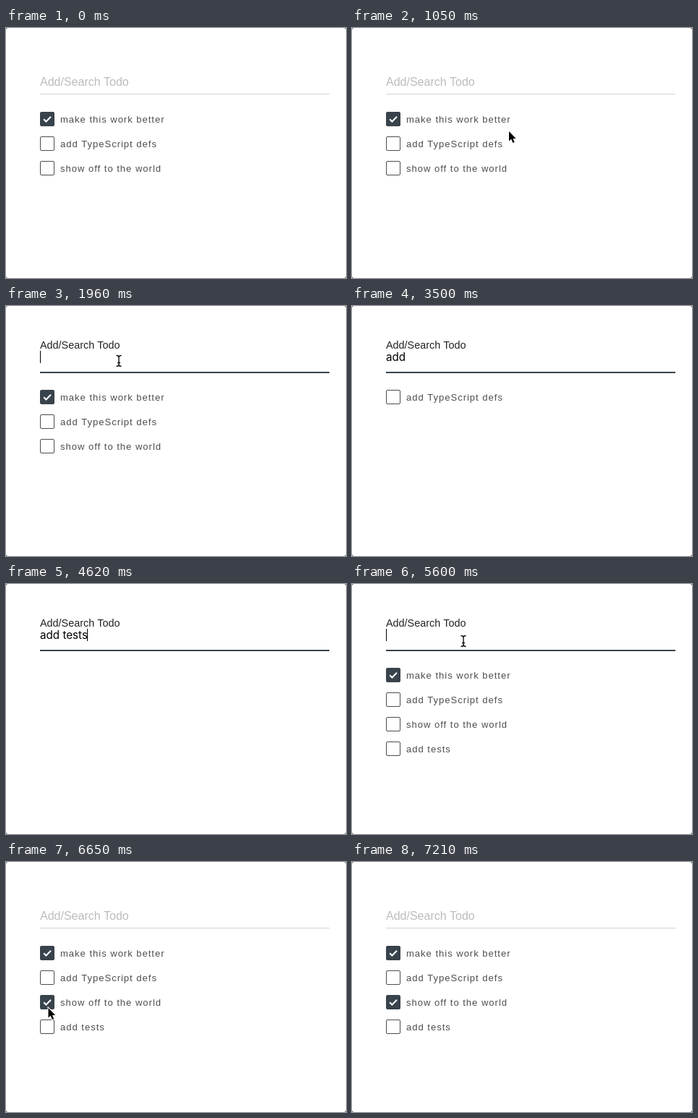
Recreate the animation shown at these times as an HTML page with a canvas. Size 470x346 px, loop 7770 ms.

```html
<!DOCTYPE html>
<html lang="en">
<head>
<meta charset="utf-8">
<title>Todo list</title>
<style>
  html, body { margin: 0; width: 470px; height: 346px; overflow: hidden; background: #fff; }
  canvas { display: block; width: 470px; height: 346px; }
</style>
</head>
<body>
<canvas id="stage"></canvas>
<script>
const W = 470, H = 346, LOOP = 7770, STEP = 70;
const LEFT = 47, RIGHT = 447, DARK = '#39434c';
const LABEL_FONT = '"Liberation Sans", Arial, sans-serif';
const INPUT_FONT = '15.2px Inter, sans-serif';

const canvas = document.getElementById('stage');
const ctx = canvas.getContext('2d');
const dpr = window.devicePixelRatio || 1;
canvas.width = W * dpr;
canvas.height = H * dpr;

// [time, text in the field]
const typing = [
  [0, ''], [2240, 'a'], [2660, 'ad'], [2800, 'add'], [3010, 'add '],
  [4060, 'add t'], [4200, 'add te'], [4340, 'add tes'],
  [4480, 'add test'], [4620, 'add tests'], [5180, '']
];

// [time, x, y] of the pointer tip, one path per visit
const visits = [
  [[980, 281, 204], [1050, 217, 143], [1120, 217, 143], [1190, 208, 135],
   [1330, 179, 105], [1470, 161, 83], [1610, 156, 76], [2170, 156, 76]],
  [[5600, 154, 79], [5740, 137, 104], [5880, 107, 147], [6020, 84, 173],
   [6160, 71, 185], [6370, 61, 191], [6580, 61, 192], [6720, 56, 212],
   [6930, 42, 276], [7140, 28, 338]]
];

const clamp = v => Math.max(0, Math.min(1, v));
const mix = (a, b, p) => a + (b - a) * p;
const ease = p => p * p * (3 - 2 * p);
const gray = v => `rgb(${v},${v},${v})`;

function fieldText(t) {
  return typing.filter(k => k[0] <= t).pop()[1];
}

function pointerAt(t) {
  const path = visits.find(v => t >= v[0][0] && t <= v[v.length - 1][0]);
  if (!path) return null;
  const i = Math.max(1, path.findIndex(k => k[0] >= t));
  const a = path[i - 1], b = path[i];
  const p = (t - a[0]) / (b[0] - a[0]);
  return [mix(a[1], b[1], p), mix(a[2], b[2], p)];
}

function focusAt(t) {
  return ease(t < 5000 ? clamp((t - 1680) / 280) : 1 - clamp((t - 6370) / 280));
}

function caretOn(t) {
  if (t < 1750 || t >= 6440) return false;
  return !(t >= 3500 && t < 4060) && !(t >= 5670 && t < 6160);
}

function itemsAt(t) {
  const list = [
    { text: 'make this work better', done: true },
    { text: 'add TypeScript defs', done: false },
    { text: 'show off to the world', done: t >= 6510 }
  ];
  if (t >= 5180) list.push({ text: 'add tests', done: false });
  const query = fieldText(t).trim();
  return list.filter(item => item.text.includes(query));
}

function text(str, x, y, font, color, spacing = 0) {
  ctx.font = font;
  ctx.letterSpacing = spacing + 'px';
  ctx.fillStyle = color;
  ctx.fillText(str, x, y);
}

function trace(points, close) {
  ctx.beginPath();
  points.forEach(([x, y]) => ctx.lineTo(x, y));
  if (close) ctx.closePath();
}

function drawField(t) {
  const f = focusAt(t);
  const hover = t < 5000 ? clamp((t - 1400) / 210) : 0;
  ctx.fillStyle = gray(Math.round(mix(210, 172, hover)));
  ctx.fillRect(LEFT, 91, RIGHT - LEFT, 1);
  ctx.globalAlpha = f;
  ctx.fillStyle = DARK;
  ctx.fillRect(LEFT, 91, RIGHT - LEFT, 2);
  ctx.globalAlpha = 1;

  text('Add/Search Todo', LEFT, mix(80, 59, f), `${mix(16, 14.4, f)}px ${LABEL_FONT}`,
    gray(Math.round(mix(188, 34, f))));

  const value = fieldText(t);
  text(value, LEFT, 76, INPUT_FONT, '#000');
  if (caretOn(t)) {
    const x = LEFT + Math.floor(ctx.measureText(value).width);
    ctx.fillRect(x, 62, 1, 17);
  }
}

function drawItem(item, row) {
  const y = 116 + row * 34;
  ctx.beginPath();
  ctx.roundRect(LEFT + 0.5, y + 0.5, 19, 19, 1.5);
  ctx.fillStyle = item.done ? DARK : '#fff';
  ctx.fill();
  ctx.lineWidth = 1;
  ctx.strokeStyle = item.done ? DARK : '#4a4d50';
  ctx.stroke();
  if (item.done) {
    trace([[52.2, y + 10.3], [55.4, y + 13.5], [62, y + 6.7]]);
    ctx.lineWidth = 2;
    ctx.strokeStyle = '#fff';
    ctx.stroke();
  }
  text(item.text, 75, y + 15, `13px ${LABEL_FONT}`, '#4e4e4e', 1);
}

function drawArrow() {
  trace([[0, 0], [0, 13.6], [3.1, 10.8], [5.4, 16], [7.7, 15], [5.5, 10], [9.7, 10]], true);
  ctx.lineWidth = 2;
  ctx.strokeStyle = '#fff';
  ctx.stroke();
  ctx.fillStyle = '#000';
  ctx.fill();
}

function drawBeam() {
  ctx.beginPath();
  for (const s of [-1, 1]) {
    ctx.moveTo(-3.5, 7.5 * s);
    ctx.quadraticCurveTo(0, 7.5 * s, 0, 5 * s);
    ctx.quadraticCurveTo(0, 7.5 * s, 3.5, 7.5 * s);
  }
  ctx.moveTo(0, -6);
  ctx.lineTo(0, 6);
  ctx.moveTo(-2, 2.5);
  ctx.lineTo(2, 2.5);
  for (const [width, color] of [[3, '#fff'], [1.4, '#111']]) {
    ctx.lineWidth = width;
    ctx.strokeStyle = color;
    ctx.stroke();
  }
}

function drawPointer(t) {
  const at = pointerAt(t);
  if (!at) return;
  ctx.save();
  ctx.translate(at[0], at[1]);
  if (at[1] < 92) drawBeam();
  else drawArrow();
  ctx.restore();
}

function draw(t) {
  ctx.setTransform(dpr, 0, 0, dpr, 0, 0);
  ctx.fillStyle = '#555';
  ctx.fillRect(0, 0, W, H);
  ctx.beginPath();
  ctx.roundRect(0, 0, W, H, 3);
  ctx.fillStyle = '#fff';
  ctx.fill();
  drawField(t);
  itemsAt(t).forEach(drawItem);
  drawPointer(t);
}

const start = performance.now();
function tick() {
  const t = (performance.now() - start) % LOOP;
  draw(Math.floor(t / STEP) * STEP);
  requestAnimationFrame(tick);
}
tick();
</script>
</body>
</html>
```
